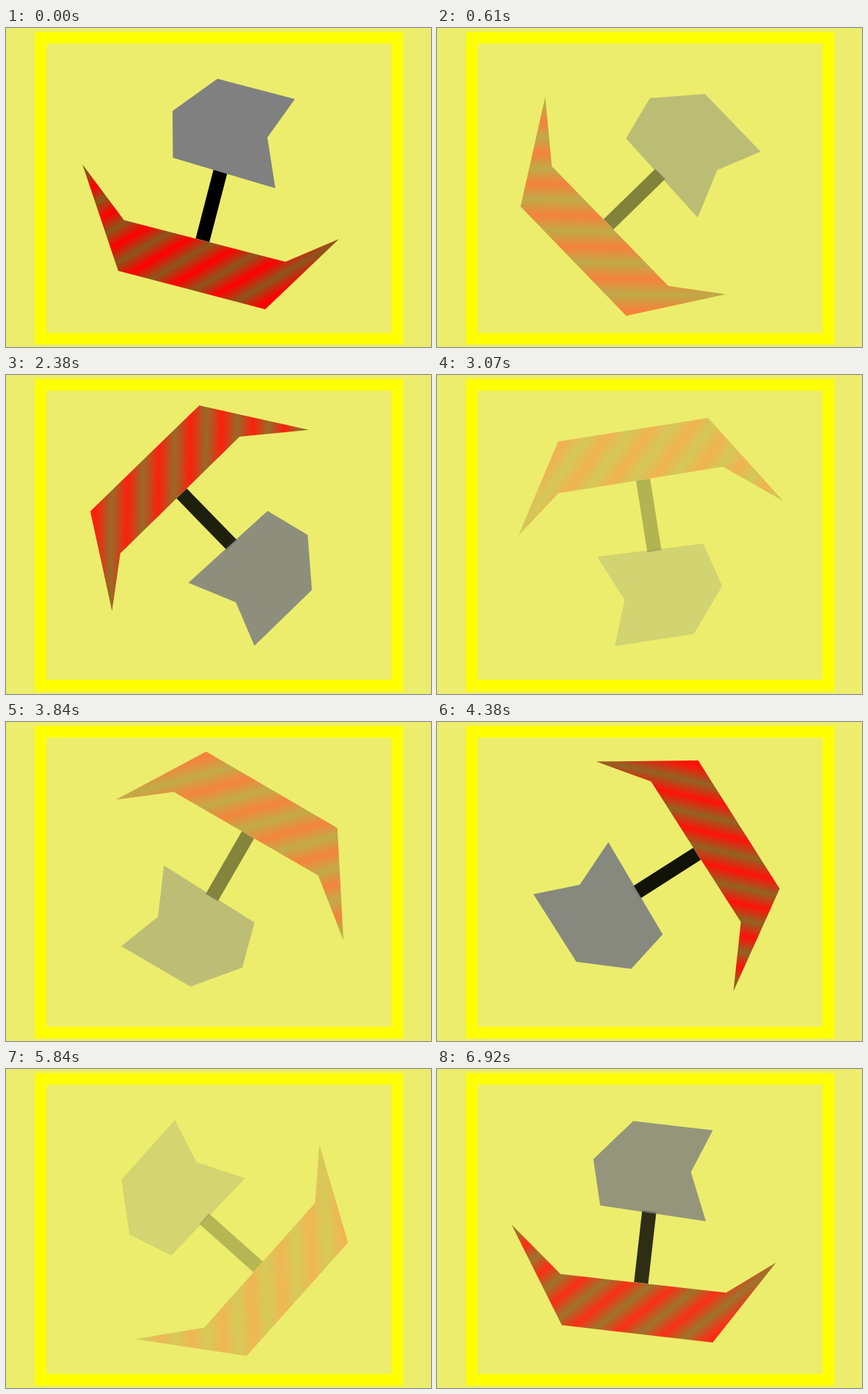
Recreate the animation shown at these times as an HTML page. Size 587 px wide and 440 px high, loop 6990 ms.

```html
<!DOCTYPE html>
<html lang="en">
<head>
<meta charset="utf-8">
<title>Turning boat</title>
<style>
  html, body { margin: 0; width: 100%; height: 100%; overflow: hidden; background: #eced6c; }
  svg { display: block; width: 587px; height: 440px; }
</style>
</head>
<body>
<svg viewBox="0 0 587 440">
  <defs>
    <linearGradient id="stripes" gradientUnits="userSpaceOnUse" x1="237.8" y1="125.1" x2="379.3" y2="366.2"></linearGradient>
  </defs>
  <rect x="48" y="13.5" width="492.5" height="415" fill="none" stroke="#ff0" stroke-width="16"/>
  <g id="ship">
    <polygon fill="url(#stripes)" points="105.5,188 163,265 386,322.5 460,291 358,388 155,335"/>
    <polygon fill="#000" points="262,290.3 281,295.3 306,198.7 287,193.7"/>
    <polygon fill="#808080" points="292,70 399,98 361,151 372,221 230.5,179 230,114.5"/>
  </g>
</svg>
<script>
  const LOOP = 6990;
  const STEP = LOOP / 91;     // the picture advances in even ticks
  const TURN = 3.911;         // degrees per tick
  const FADE = 2232;          // full, clear, full again
  const BANDS = 13;

  const ship = document.getElementById('ship');
  const stripes = document.getElementById('stripes');

  for (let i = 0; i <= BANDS; i++) {
    const stop = document.createElementNS('http://www.w3.org/2000/svg', 'stop');
    stop.setAttribute('offset', i / BANDS);
    stop.setAttribute('stop-color', i % 2 ? '#f00' : '#8a571c');
    stripes.append(stop);
  }

  function draw(time) {
    const tick = Math.floor((time % LOOP + 8.5) / STEP) % 91;
    const phase = tick * STEP / FADE % 1;
    const opacity = Math.abs(1 - 2 * phase);
    ship.setAttribute('transform', `rotate(${tick * TURN} 293.5 220)`);
    // each part fades on its own, so overlaps show through
    for (const part of ship.children) part.setAttribute('opacity', opacity);
  }

  const start = performance.now();
  function loop() {
    draw(performance.now() - start);
    requestAnimationFrame(loop);
  }
  loop();
</script>
</body>
</html>
```
